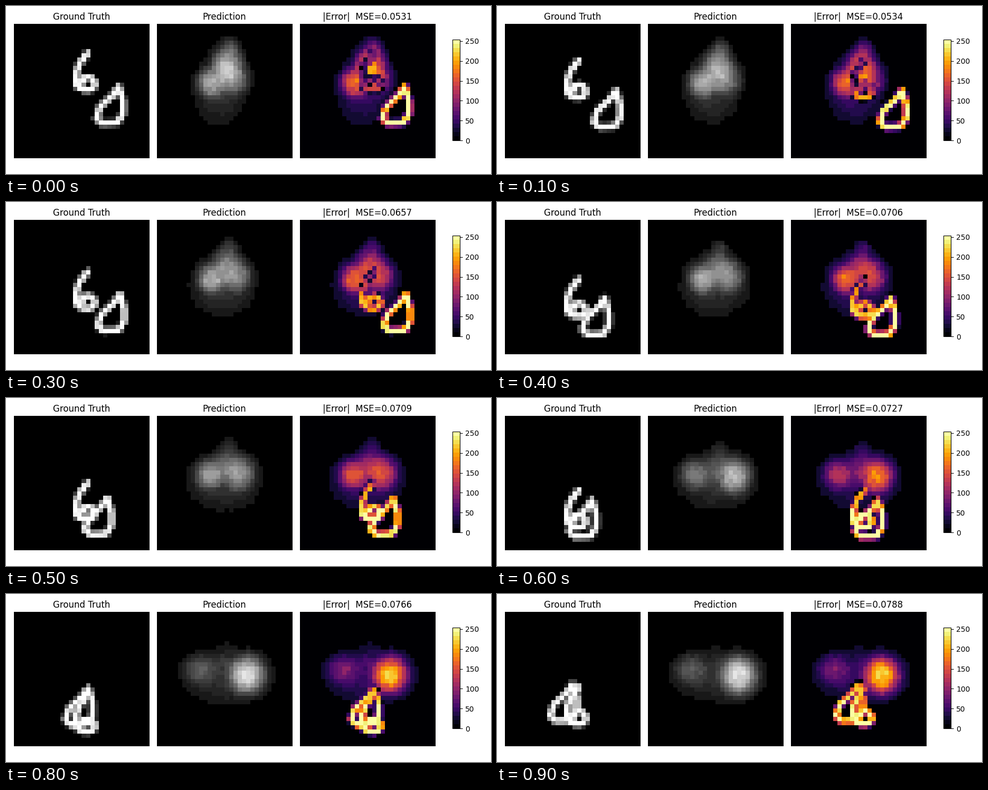
These frames come from a looping animation (919x320 px, 1000 ms). A matplotlib script:

```python
import numpy as np
import matplotlib.pyplot as plt
from matplotlib.animation import FuncAnimation

W, H, DPI = 919, 320, 100
GRID, FRAMES, INTERVAL, SUB = 32, 10, 100, 4
VMAX = 253

plt.rcParams["font.family"] = "DejaVu Sans"

MSE = [0.0531, 0.0534, 0.0596, 0.0657, 0.0706,
       0.0709, 0.0727, 0.0745, 0.0766, 0.0788]

fine_y, fine_x = (np.mgrid[:GRID * SUB, :GRID * SUB] + 0.5) / SUB
cell_y, cell_x = np.mgrid[:GRID, :GRID] + 0.5


def six_stroke():
    """A curved stem that runs into a tightening loop."""
    stem = [(3.4, 0.4), (1.6, 2.8), (0.8, 5)]
    k = np.linspace(0, 1, 16)
    angle = np.pi * (1 - 1.95 * k)
    loop = np.column_stack([3.1 + 0.3 * k + (2.4 - 1.1 * k) * np.cos(angle),
                            7.7 + 1.55 * np.sin(angle)])
    return np.vstack([stem, loop])


SIX = six_stroke()
ZERO = np.array([(6.1, 0.5), (4.6, 2.7), (1.7, 5.3), (0.8, 8), (2, 9.25),
                 (5.8, 9.1), (7.1, 7), (7.1, 4), (6.1, 0.5)])


def draw_stroke(points, half=0.7, soft=0.4):
    """Rasterise a polyline and average it down to the grid."""
    dist = np.full(fine_x.shape, np.inf)
    for (x0, y0), (x1, y1) in zip(points[:-1], points[1:]):
        dx, dy = x1 - x0, y1 - y0
        s = ((fine_x - x0) * dx + (fine_y - y0) * dy) / (dx * dx + dy * dy)
        s = np.clip(s, 0, 1)
        dist = np.minimum(dist, np.hypot(fine_x - x0 - s * dx,
                                         fine_y - y0 - s * dy))
    ink = np.clip((half - dist) / soft + 0.5, 0, 1)
    ink = ink.reshape(GRID, SUB, GRID, SUB).mean(axis=(1, 3))
    return np.clip(ink * 1.08, 0, 1) * VMAX


def bounce(start, speed, limit, t):
    return limit - abs(limit - start - speed * t)


def ground_truth(t):
    six = (14, bounce(6.5, 1.8, 20.1, t))
    zero = (bounce(18.6, 1.5, 21.0, t), bounce(14.4, 0.92, 19.7, t))
    image = np.maximum(draw_stroke(SIX + six), draw_stroke(ZERO + zero))
    return np.where(image < 24, 0, image)


def blob(start, end, amount):
    """Soft spot given as x, y, x radius, y radius, brightness."""
    x, y, rx, ry, level = np.array(start) + amount * np.subtract(end, start)
    r = np.hypot((cell_x - x) / rx, (cell_y - y) / ry)
    return level * np.exp(-r ** 2.5)


def prediction(t):
    """One smear that slowly widens, then splits into a dim and a bright lobe."""
    drift = t / (FRAMES - 1)
    split = 1 / (1 + np.exp((5.8 - t) / 0.5))
    spots = [
        blob((16.6, 10.9, 3.7, 4.9, 195), (16.4, 13.2, 3.8, 3.4, 35), drift),
        blob((13.1, 14.1, 3.4, 3.6, 172), (10.4, 13.9, 4.4, 3.8, 85), split),
        blob((18.2, 13.2, 3.6, 4.0, 115), (21.3, 15.1, 4.3, 4.5, 222),
             0.4 * drift + 0.6 * split),
        blob((14.8, 15.8, 6.2, 8.2, 48), (16.8, 15.2, 11.6, 6.6, 46), drift),
        blob((17.2, 6.3, 2.2, 3.0, 95), (16.6, 9.5, 2.2, 2.4, 15), drift),
    ]
    image = sum(spot ** 3 for spot in spots) ** (1 / 3)
    rng = np.random.default_rng(40 + t)
    image *= 1 + 0.05 * rng.standard_normal(image.shape)
    return np.where(image < 18, 0, np.round(image / 12) * 12)


def add_axes(left, top, width, height):
    return fig.add_axes([left / W, 1 - (top + height) / H,
                         width / W, height / H])


def add_panel(index, title, cmap):
    ax = add_axes(15.35 + 270.6 * index, 34, 256.2, 256)
    ax.axis("off")
    image = ax.imshow(np.zeros((GRID, GRID)), cmap=cmap, vmin=0, vmax=VMAX,
                      interpolation="nearest", aspect="auto")
    return image, ax.set_title(title, fontsize=12)


fig = plt.figure(figsize=(W / DPI, H / DPI), dpi=DPI, facecolor="white")
truth_image, _ = add_panel(0, "Ground Truth", "gray")
pred_image, _ = add_panel(1, "Prediction", "gray")
error_image, error_title = add_panel(2, "", plt.get_cmap("inferno", 24))
fig.colorbar(error_image, cax=add_axes(846.2, 64.3, 14.2, 192.1),
             ticks=range(0, 251, 50))


def update(frame):
    truth, pred = ground_truth(frame), prediction(frame)
    truth_image.set_data(truth)
    pred_image.set_data(pred)
    error_image.set_data(np.abs(truth - pred))
    error_title.set_text(f"|Error|  MSE={MSE[frame]:.4f}")
    return truth_image, pred_image, error_image, error_title


anim = FuncAnimation(fig, update, frames=FRAMES, interval=INTERVAL,
                     repeat=True, repeat_delay=0, blit=False)
plt.show()
```
